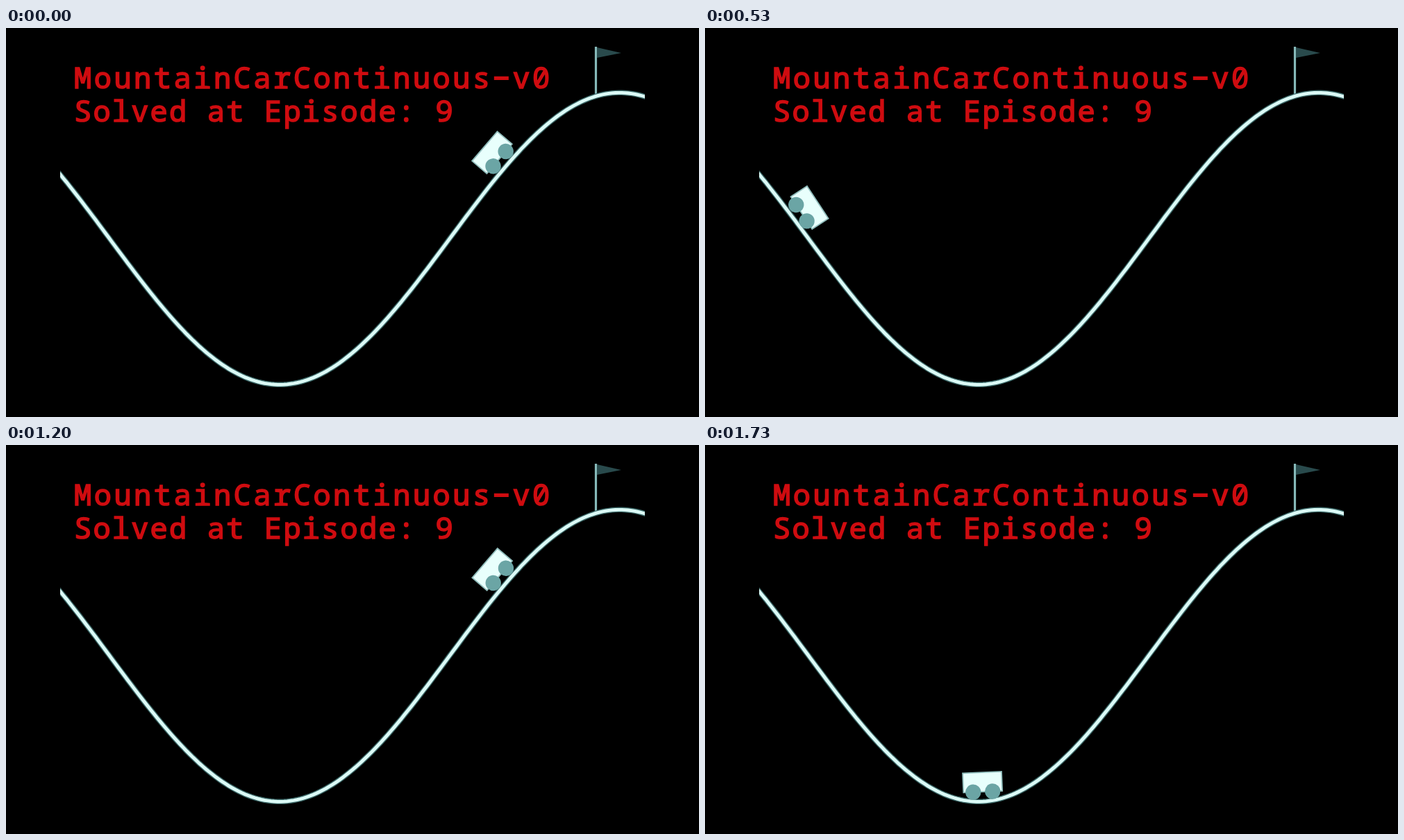
Animation, 998 px wide and 561 px high, one loop 1800 ms. Source, as an HTML page:

```html
<!DOCTYPE html>
<html lang="en">
<head>
<meta charset="utf-8">
<title>Mountain car</title>
<style>
  html, body { margin: 0; width: 100%; height: 100%; overflow: hidden; background: #000; }
  svg { display: block; width: 998px; height: 561px; }
  text {
    font: 42px "Noto Sans Mono", "DejaVu Sans Mono", monospace;
    fill: #cf0c10; stroke: #cf0c10; stroke-width: 1.7; white-space: pre;
  }
  .track { fill: none; }
  .edge { stroke: #3c6868; stroke-width: 7.6; }
  .core { stroke: #dcfbf7; stroke-width: 4.8; }
  .body { fill: #e8fffc; stroke: #8fbcbb; stroke-width: 1.8; }
  .wheel { fill: #6ba5a5; }
</style>
</head>
<body>
<svg viewBox="0 0 998 561">
  <defs>
    <clipPath id="span"><rect x="78" y="0" width="842" height="561"/></clipPath>
  </defs>
  <text x="98" y="87" letter-spacing="3.5">MountainCarContinuous−v0</text>
  <text x="98" y="135" letter-spacing="2.2">Solved at Episode: 9</text>
  <path d="M849.5 27V98" stroke="#86b9b9" stroke-width="3.2"/>
  <path d="M851 28L886 36L851 43Z" fill="#294a4c"/>
  <g clip-path="url(#span)">
    <path class="track edge"/>
    <path class="track core"/>
  </g>
  <g id="car">
    <rect class="body" x="-28" y="-42" width="56" height="28"/>
    <circle class="wheel" cx="-14" cy="-14" r="11.2"/>
    <circle class="wheel" cx="14" cy="-14" r="11.2"/>
  </g>
</svg>
<script>
  const LOOP = 1800, FRAMES = 27, STEPS = 4;
  const SCALE = 842 / 1.8, LEFT = -1.2;

  const toX = p => 77.6 + (p - LEFT) * SCALE;
  const toY = p => 303.8 - 0.45 * SCALE * Math.sin(3 * p);

  // Swings of the car: start frame, position, speed per step, engine force
  const swings = [
    [0, 0.176, -0.0165, 0],
    [6, -0.785, -0.046, 0],
    [8, -1.094, -0.0297, 0.05],
    [14, -0.693, 0.047, 1],
    [18, 0.1765, 0.05, 1],
    [20, -0.4355, 0, 0.2],
    [26, -0.509, 0, 0]
  ];

  function positionAt(frame) {
    let [start, p, v, force] = swings.filter(s => s[0] <= frame).pop();
    for (let i = (frame - start) * STEPS; i > 0; i--) {
      v += 0.0015 * force - 0.0025 * Math.cos(3 * p);
      v = Math.max(-0.07, Math.min(0.07, v));
      p += v;
      if (p < LEFT) { p = LEFT; v = 0; }
    }
    return p;
  }

  const points = [];
  for (let p = LEFT - 0.02; p < 0.63; p += 0.01) {
    points.push(toX(p).toFixed(1) + " " + toY(p).toFixed(1));
  }
  document.querySelectorAll(".track").forEach(t => t.setAttribute("d", "M" + points.join("L")));

  const car = document.getElementById("car");
  const began = performance.now();

  function draw(now) {
    const t = Math.max(0, now - began) % LOOP;
    const frame = Math.min(FRAMES - 1, Math.floor((t + 10.2) * FRAMES / LOOP));
    const p = positionAt(frame);
    const angle = -Math.cos(3 * p) * 180 / Math.PI;
    car.setAttribute("transform", `translate(${toX(p)} ${toY(p)}) rotate(${angle})`);
    requestAnimationFrame(draw);
  }
  draw(began);
</script>
</body>
</html>
```
